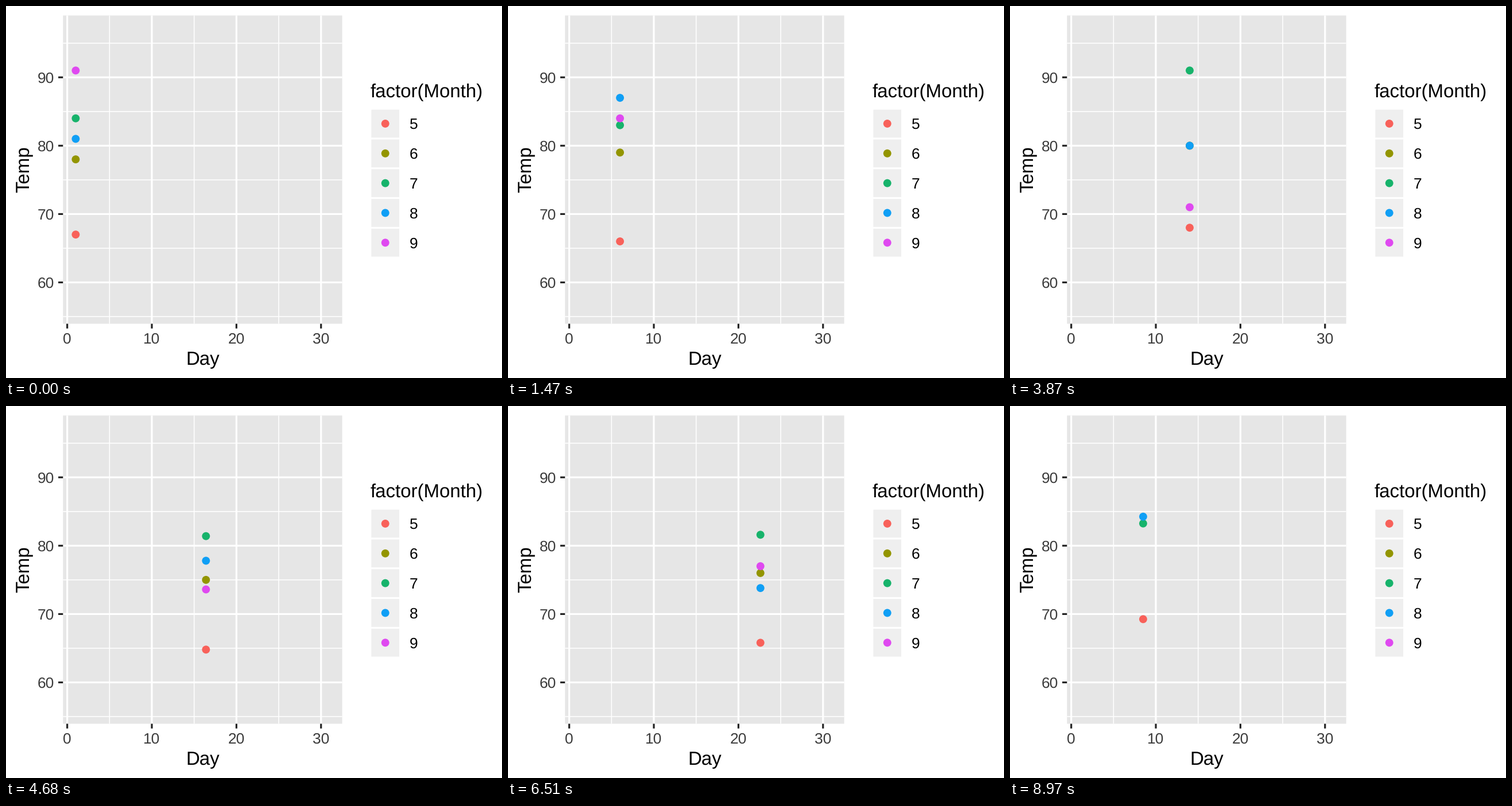
These frames come from a looping animation (864 by 648 pixels, 9 s). A matplotlib script:

```python
import matplotlib.pyplot as plt
import numpy as np
from matplotlib.animation import FuncAnimation
from matplotlib.patches import Rectangle

plt.rcParams["font.family"] = "Liberation Sans"
plt.rcParams["text.hinting"] = "none"

W, H, DPI = 864, 648, 216
PX = 72 / DPI  # points per pixel
FRAMES, INTERVAL = 300, 30

# Daily temperatures from the airquality data set
MAY = [67, 72, 74, 62, 56, 66, 65, 59, 61, 69, 74, 69, 66, 68, 58, 64,
       66, 57, 68, 62, 59, 73, 61, 61, 57, 58, 57, 67, 81, 79, 76]
JUNE = [78, 74, 67, 84, 85, 79, 82, 87, 90, 87, 93, 92, 82, 80, 79, 77,
        72, 65, 73, 76, 77, 76, 76, 76, 75, 78, 73, 80, 77, 83]
JULY = [84, 85, 81, 84, 83, 83, 88, 92, 92, 89, 82, 73, 81, 91, 80, 81,
        82, 84, 87, 85, 74, 81, 82, 86, 85, 82, 86, 88, 86, 83, 81]
AUGUST = [81, 81, 82, 86, 85, 87, 89, 90, 90, 92, 86, 86, 82, 80, 79, 77,
          79, 76, 78, 78, 77, 72, 75, 79, 81, 86, 88, 97, 94, 96, 94]
SEPTEMBER = [91, 92, 93, 93, 87, 84, 80, 78, 75, 73, 81, 76, 77, 71, 71, 78,
             67, 76, 68, 82, 64, 71, 81, 69, 63, 70, 77, 75, 76, 68]

DAYS = 31
COLORS = ["#f8615a", "#939500", "#17b36b", "#109ff5", "#df49f0"]
temps = np.full((5, DAYS), np.nan)
for row, month in zip(temps, (MAY, JUNE, JULY, AUGUST, SEPTEMBER)):
    row[:len(month)] = month

# Panel edges in pixels and axis limits in data units
LEFT, RIGHT, TOP, BOTTOM = 99.3, 585.6, 16.5, 553.5
X_MIN, X_MAX, Y_MIN, Y_MAX = -0.5, 32.5, 53.95, 99.05


def to_x(day):
    return LEFT + (day - X_MIN) / (X_MAX - X_MIN) * (RIGHT - LEFT)


def to_y(temp):
    return BOTTOM - (temp - Y_MIN) / (Y_MAX - Y_MIN) * (BOTTOM - TOP)


fig = plt.figure(figsize=(W / DPI, H / DPI), dpi=DPI, facecolor="white")
ax = fig.add_axes([0, 0, 1, 1])
ax.set_xlim(0, W)
ax.set_ylim(H, 0)
ax.axis("off")


def box(x, y, w, h, color):
    ax.add_patch(Rectangle((x, y), w, h, fc=color, lw=0, snap=False))


def lines(xs, ys, color, width):
    for x in xs:
        ax.plot(x, ys, color=color, lw=width * PX, snap=False,
                solid_capstyle="butt")


def v_lines(days, y0, y1, color, width):
    lines([[to_x(d)] * 2 for d in days], [y0, y1], color, width)


def h_lines(levels, x0, x1, color, width):
    for t in levels:
        lines([[x0, x1]], [to_y(t)] * 2, color, width)


def label(x, y, text, size, color="black", ha="left", **kw):
    ax.text(x, y, text, size=size, color=color, ha=ha, va="baseline", **kw)


def dots(x, y, z):
    return ax.scatter(x, y, s=4.62 ** 2, c=COLORS, linewidths=0,
                      snap=False, zorder=z)


# Panel, grid and axes
box(LEFT, TOP, RIGHT - LEFT, BOTTOM - TOP, "#e6e6e6")
x_ticks, y_ticks = range(0, 31, 10), range(60, 91, 10)
h_lines(range(55, 96, 10), LEFT, RIGHT, "white", 1.6)
v_lines(range(5, 26, 10), TOP, BOTTOM, "white", 1.6)
h_lines(y_ticks, LEFT, RIGHT, "white", 3.2)
v_lines(x_ticks, TOP, BOTTOM, "white", 3.2)
h_lines(y_ticks, LEFT - 8.25, LEFT, "#242424", 3.2)
v_lines(x_ticks, BOTTOM, BOTTOM + 8.25, "#242424", 3.2)
for d in x_ticks:
    label(to_x(d), 587.4, str(d), 8.8, "#3c3c3c", "center")
for t in y_ticks:
    label(LEFT - 14.85, to_y(t) + 9.45, str(t), 8.8, "#3c3c3c", "right")
label((LEFT + RIGHT) / 2, 624.8, "Day", 11, ha="center")
label(40.1, (TOP + BOTTOM) / 2, "Temp", 11, ha="center",
      rotation=90, rotation_mode="anchor")

# Legend
KEY, KEY_X, KEY_Y = 51.84, 634.8, 179.0
label(KEY_X, 159.3, "factor(Month)", 11)
key_mid = KEY_Y + KEY * (np.arange(5) + 0.5)
for month, y in enumerate(key_mid, start=5):
    side = KEY - 3.2
    box(KEY_X + 1.6, y - side / 2, side, side, "#efefef")
    label(703.1, y + 9.45, str(month), 8.8)
dots(np.full(5, KEY_X + KEY / 2), key_mid, 3)

points = dots(np.full(5, to_x(1)), to_y(temps[:, 0]), 4)

# Each day rests, then glides to the next; the last one glides back to day 1
timeline = []
for d in range(DAYS):
    steps = 5 if d < 22 else 4
    timeline += [(d, 0)] * 5
    timeline += [(d, k / steps) for k in range(1, steps)] + [(d + 1, 0)]


def update(frame):
    now, part = timeline[frame]
    day, temp = now + 1.0, temps[:, now]
    if part:
        after = (now + 1) % DAYS
        day += part * (after - now)
        temp = temp + part * (temps[:, after] - temp)
    shown = ~np.isnan(temp)
    points.set_offsets(np.column_stack(
        [np.full(shown.sum(), to_x(day)), to_y(temp[shown])]))
    points.set_facecolors([c for c, s in zip(COLORS, shown) if s])
    return [points]


anim = FuncAnimation(fig, update, frames=FRAMES, interval=INTERVAL,
                     repeat=True, repeat_delay=0)
plt.show()
```
